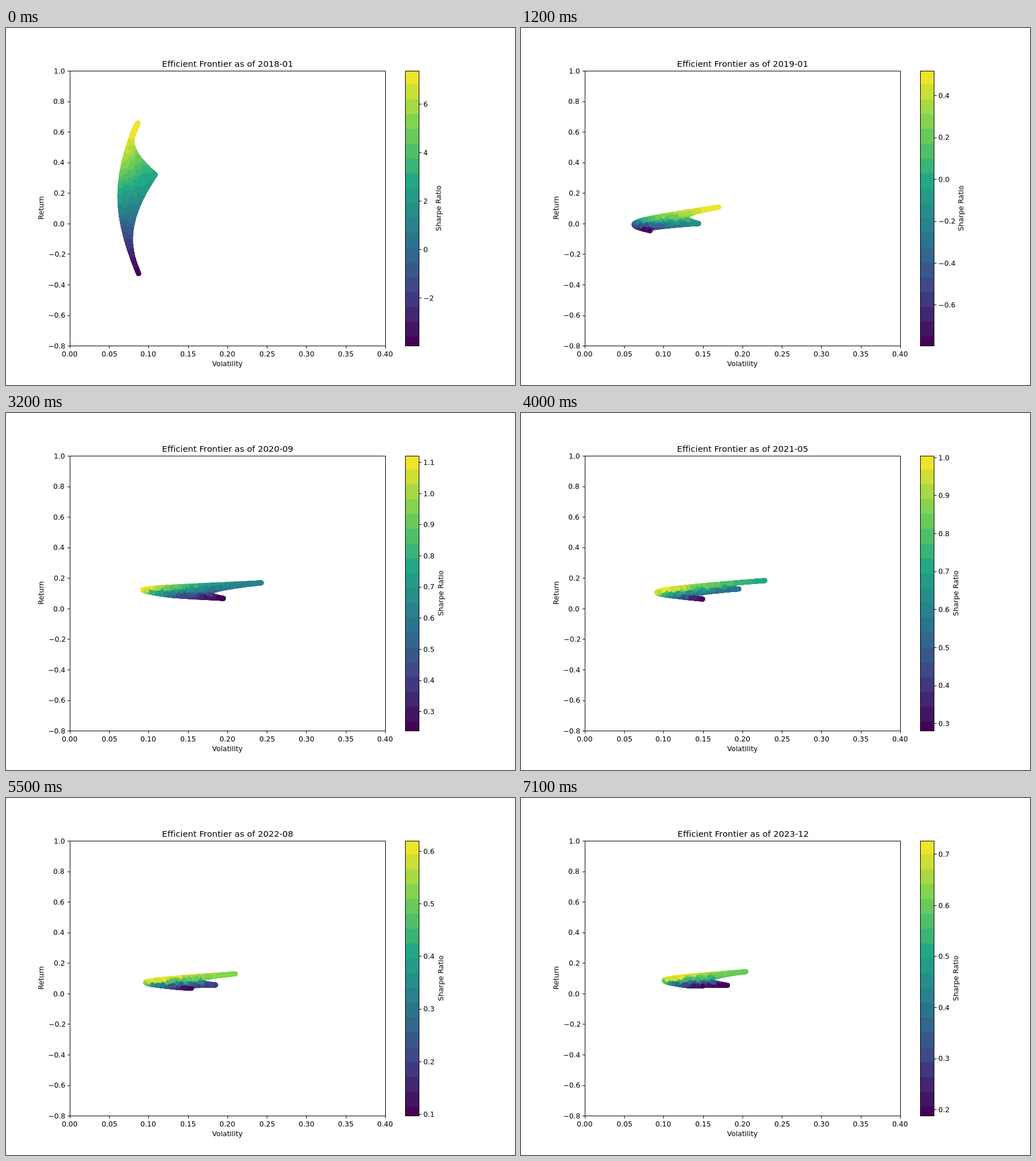
These frames come from a looping animation (894x626 px, 7.2 s). An HTML page with a canvas:

```html
<!DOCTYPE html>
<html lang="en">
<head>
<meta charset="utf-8">
<title>Efficient Frontier</title>
<style>
html, body { margin: 0; width: 894px; height: 626px; overflow: hidden; background: #fff; }
canvas { display: block; }
</style>
</head>
<body>
<canvas id="chart" width="894" height="626"></canvas>
<script>
const ctx = document.getElementById('chart').getContext('2d');
const STEP = 100, MONTHS = 72, COUNT = 4500;
const PT = 1.242, TICK = 3.5 * PT, PAD = 7 * PT;
const LEFT = 111.75, RIGHT = 666.03, TOP = 75.12, BOTTOM = 557.14;
const BAR = 700.67, BAR_END = 724.78, HEIGHT = BOTTOM - TOP;
const MID_X = (LEFT + RIGHT) / 2, MID_Y = (TOP + BOTTOM) / 2;

// Three assets as [return, volatility], and the correlation of A with C
const POSES = [
  { month: 0, a: [.658, .0866], b: [.32, .1085], c: [-.328, .0875], ac: .1 },
  { month: 12, a: [.108, .17], b: [0, .1445], c: [-.046, .083], ac: -.33 },
  { month: 23, a: [.146, .1465], b: [.018, .1315], c: [.045, .095], ac: -.395 },
  { month: 32, a: [.17, .243], b: [.068, .195], c: [.105, .13], ac: -.376 },
  { month: 40, a: [.183, .2285], b: [.128, .1955], c: [.062, .1495], ac: -.477 },
  { month: 55, a: [.129, .21], b: [.056, .185], c: [.035, .1545], ac: -.407 },
  { month: 71, a: [.143, .2045], b: [.054, .181], c: [.05, .15], ac: -.31 }
];
const CORR_AB = .38, CORR_BC = .3, RISK_FREE = .02;
const CRASH = 26, CRASH_DROP = .1;

const VIRIDIS = ['440154', '414487', '2a788e', '22a884', '7ad151', 'fde725']
  .map(hex => [0, 2, 4].map(i => parseInt(hex.slice(i, i + 2), 16)));
const BAND = 26, BANDS = 19, BAND_SHIFT = 10;

const lerp = (a, b, f) => a + (b - a) * f;

const palette = Array.from({ length: BANDS }, (_, i) => {
  const pos = (i * BAND + 3) / HEIGHT * (VIRIDIS.length - 1);
  const k = Math.floor(pos);
  return `rgb(${VIRIDIS[k].map((c, j) => Math.round(lerp(c, VIRIDIS[k + 1][j], pos - k)))})`;
});
const shade = v => palette[Math.floor((v * HEIGHT + BAND_SHIFT) / BAND)];

let seed = 20180;
function random() {
  seed = (seed * 1664525 + 1013904223) % 4294967296;
  return seed / 4294967296;
}

const weights = Array.from({ length: COUNT }, () => {
  const w = [0, 0, 0].map(() => random() ** 2.2);
  const sum = w.reduce((a, b) => a + b);
  return w.map(x => x / sum);
});
weights.push([1, 0, 0], [0, 1, 0], [0, 0, 1]);

// Estimates over a growing window drift with 1 / length; the crash is a sudden jump
function poseAt(month) {
  const i = Math.max(1, POSES.findIndex(p => p.month >= month));
  const from = POSES[i - 1], to = POSES[i];
  const inv = m => 1 / (m + 1);
  let f = (inv(month) - inv(from.month)) / (inv(to.month) - inv(from.month));
  if (from.month < CRASH && CRASH < to.month) f = month < CRASH ? 0 : 1;
  const drop = month < CRASH ? 0 : CRASH_DROP * .5 ** (month - CRASH);
  const asset = key => {
    const [ret, vol] = from[key].map((v, j) => lerp(v, to[key][j], f));
    return [ret - drop, vol];
  };
  return { assets: ['a', 'b', 'c'].map(asset), ac: lerp(from.ac, to.ac, f) };
}

function portfolios(month) {
  const { assets, ac } = poseAt(month);
  return weights.map(w => {
    const ret = assets.reduce((sum, [r], i) => sum + r * w[i], 0);
    const [a, b, c] = assets.map(([, s], i) => s * w[i]);
    const vol = Math.sqrt(a * a + b * b + c * c
      + 2 * (CORR_AB * a * b + CORR_BC * b * c + ac * a * c));
    return { ret, vol, sharpe: (ret - RISK_FREE) / vol };
  });
}

const snap = v => Math.round(v) + .5;
const px = vol => LEFT + vol / .4 * (RIGHT - LEFT);
const py = ret => BOTTOM - (ret + .8) / 1.8 * HEIGHT;
const label = (v, digits) => v.toFixed(digits).replace(/^-(0\.?0*$)/, '$1').replace('-', '\u2212');

function inkWidth(str, size = 10) {
  ctx.font = `${size * PT}px "DejaVu Sans", sans-serif`;
  const m = ctx.measureText(str);
  return m.actualBoundingBoxLeft + m.actualBoundingBoxRight;
}

// align: 0 left, .5 centre, 1 right, on whole pixels
function text(str, x, y, align, size) {
  const width = inkWidth(str, size);
  ctx.fillText(str, Math.round(x - width * align), Math.round(y));
  return width;
}

function vertical(str, x) {
  ctx.save();
  ctx.translate(Math.round(x), Math.round(MID_Y + inkWidth(str) / 2));
  ctx.rotate(-Math.PI / 2);
  ctx.fillText(str, 0, 0);
  ctx.restore();
}

function line(x1, y1, x2, y2) {
  ctx.beginPath();
  ctx.moveTo(x1, y1);
  ctx.lineTo(x2, y2);
  ctx.stroke();
}

function box(x1, x2) {
  ctx.strokeRect(snap(x1), snap(TOP), snap(x2) - snap(x1), snap(BOTTOM) - snap(TOP));
}

function drawPoints(points, lo, hi) {
  for (const { ret, vol, sharpe } of points) {
    ctx.fillStyle = shade((sharpe - lo) / (hi - lo));
    ctx.beginPath();
    ctx.arc(px(vol), py(ret), TICK, 0, 7);
    ctx.fill();
  }
}

function drawAxes() {
  box(LEFT, RIGHT);
  for (let i = 0; i <= 8; i++) {
    const x = px(i * .05);
    line(snap(x), snap(BOTTOM), snap(x), snap(BOTTOM) + TICK);
    text(label(i * .05, 2), x, 576, .5);
  }
  for (let i = -4; i <= 5; i++) {
    const y = py(i * .2);
    line(snap(LEFT) - TICK, snap(y), snap(LEFT), snap(y));
    text(label(i * .2, 1), LEFT - PAD, y + 4.7, 1);
  }
  text('Volatility', MID_X, 593, .5);
  vertical('Return', 66);
}

function drawBar(lo, hi) {
  for (let i = 0; i < BANDS; i++) {
    const edge = k => Math.round(BOTTOM - Math.min(HEIGHT, Math.max(0, k * BAND - BAND_SHIFT)));
    ctx.fillStyle = palette[i];
    ctx.fillRect(Math.round(BAR), edge(i + 1), 24, edge(i) - edge(i + 1));
  }
  ctx.fillStyle = '#000';
  box(BAR, BAR_END);

  const raw = (hi - lo) / 9, mag = 10 ** Math.floor(Math.log10(raw));
  const step = mag * [1, 2, 2.5, 5, 10].find(s => s * mag >= raw);
  const digits = [0, 1, 2].find(n => Math.abs(step * 10 ** n - Math.round(step * 10 ** n)) < 1e-6);
  let widest = 0;
  for (let i = Math.ceil(lo / step); i * step <= hi; i++) {
    const y = BOTTOM - (i * step - lo) / (hi - lo) * HEIGHT;
    line(snap(BAR_END), snap(y), snap(BAR_END) + TICK, snap(y));
    widest = Math.max(widest, text(label(i * step, digits), BAR_END + PAD, y + 4.7, 0));
  }
  vertical('Sharpe Ratio', BAR_END + PAD + widest + 4 * PT + 9.5);
}

function draw(month) {
  const points = portfolios(month);
  const ratios = points.map(p => p.sharpe);
  const lo = Math.min(...ratios), hi = Math.max(...ratios);
  ctx.fillStyle = '#fff';
  ctx.fillRect(0, 0, 894, 626);
  ctx.strokeStyle = '#000';
  ctx.letterSpacing = '0.01px'; // keeps ligatures off
  drawPoints(points, lo, hi);
  ctx.fillStyle = '#000';
  drawAxes();
  drawBar(lo, hi);
  const date = `${2018 + Math.floor(month / 12)}-${String(month % 12 + 1).padStart(2, '0')}`;
  text('Efficient Frontier as of ' + date, MID_X, TOP - 6 * PT, .5, 12);
}

let shown = -1;
const start = performance.now();
function tick() {
  const month = Math.floor((performance.now() - start) / STEP) % MONTHS;
  if (month !== shown) draw(shown = month);
  requestAnimationFrame(tick);
}
tick();
</script>
</body>
</html>
```
